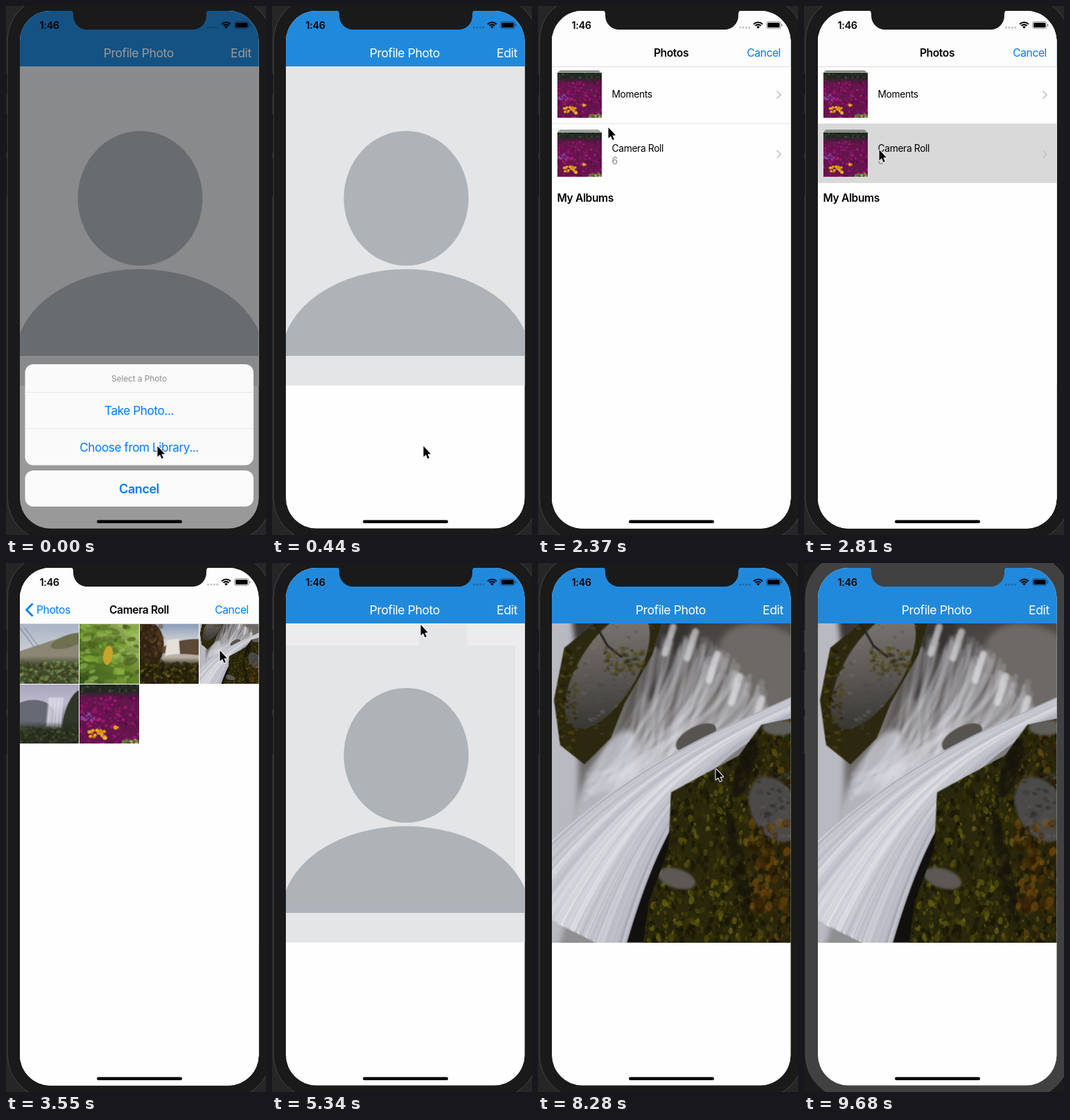
These frames come from a looping animation (375 px wide and 762 px high, 9.78 s). An HTML page with a canvas:

```html
<!DOCTYPE html>
<html lang="en">
<head>
<meta charset="utf-8">
<title>Profile photo picker</title>
<style>
html, body { margin: 0; width: 100%; height: 100%; overflow: hidden; background: #1b1b1b; }
canvas { display: block; width: 375px; height: 762px; }
</style>
</head>
<body>
<canvas id="stage"></canvas>
<script>
const W = 375, H = 762, LOOP = 9780, BEAT = 145;
const LEFT = 20, TOP = 7, WIDTH = 345, BAR = 87, MID = 192;
const BLUE = '#007aff', PAPER = '#fefefe';
const dpr = Math.max(1, window.devicePixelRatio || 1);
const canvas = document.getElementById('stage');
canvas.width = W * dpr;
canvas.height = H * dpr;
const ctx = canvas.getContext('2d');

const runs = [[0, 1], [150, 3], [730, 3], [1630, 8], [2810, 6], [4450, 2],
  [4900, 8], [6220, 3], [6810, 8], [7990, 8], [9680, 1]];

// Pointer moves: start, end, target x, target y.
const moves = [[585, 730, 263, 584], [730, 1020, 199, 421], [1630, 2355, 101, 175],
  [2355, 2645, 108, 207], [3100, 3535, 308, 126], [4755, 5335, 214, 89],
  [5335, 5915, 203, 74], [6075, 6510, 193, 75], [7845, 9005, 392, 775]];

const clamp = v => Math.max(0, Math.min(1, v));
const lerp = (a, b, p) => a + (b - a) * p;
const easeOut = p => 1 - Math.pow(1 - clamp(p), 3);
const easeInOut = p => { p = clamp(p); return p * p * (3 - 2 * p); };

function snap(t) {
  const [start, beats] = runs.filter(r => r[0] <= t).pop();
  return start + BEAT * Math.min(beats - 1, Math.floor((t - start) / BEAT));
}

function seeded(seed) {
  return () => (seed = (seed * 16807) % 2147483647) / 2147483647;
}

function rect(g, color, x, y, w, h) {
  g.fillStyle = color;
  g.fillRect(x, y, w, h);
}

function round(g, color, x, y, w, h, r) {
  g.fillStyle = color;
  g.beginPath();
  g.roundRect(x, y, w, h, r);
  g.fill();
}

function ellipse(g, color, x, y, rx, ry, tilt = 0, from = 0, to = Math.PI * 2) {
  g.fillStyle = color;
  g.beginPath();
  g.ellipse(x, y, rx, ry, tilt, from, to);
  g.fill();
}

function trace(g, pts) {
  g.beginPath();
  for (let i = 0; i < pts.length; i += 2) g.lineTo(pts[i], pts[i + 1]);
}

function poly(g, color, ...pts) {
  trace(g, pts);
  g.fillStyle = color;
  g.fill();
}

function stroke(g, color, width, ...pts) {
  trace(g, pts);
  g.strokeStyle = color;
  g.lineWidth = width;
  g.stroke();
}

function shade(g, x0, y0, x1, y1, ...colors) {
  const s = g.createLinearGradient(x0, y0, x1, y1);
  colors.forEach((c, i) => s.addColorStop(i / (colors.length - 1), c));
  return s;
}

function text(str, x, y, size, color, { weight = 400, align = 'left', track = -0.025 } = {}) {
  ctx.font = `${weight} ${size}px Inter, Roboto, sans-serif`;
  ctx.letterSpacing = `${track * size}px`;
  ctx.textAlign = align;
  ctx.fillStyle = color;
  ctx.fillText(str, x, y);
}

function picture(w, h, seed, paint) {
  const c = document.createElement('canvas');
  c.width = w * 2;
  c.height = h * 2;
  const g = c.getContext('2d');
  g.scale(2, 2);
  g.lineCap = 'round';
  paint(g, seeded(seed));
  return c;
}

// Random dabs inside a box; color(x, r) gets a place across and a random value.
function dabs(g, rnd, n, x, y, w, h, size, stretch, color) {
  for (let i = 0; i < n; i++) {
    const u = rnd(), r = size * (0.4 + rnd());
    ellipse(g, color(u, rnd()), x + u * w, y + rnd() * h, r, r * stretch, rnd() - 0.5);
  }
}

function inside(g, pts, draw) {
  g.save();
  trace(g, pts);
  g.clip();
  draw();
  g.restore();
}

const rapids = picture(345, 459, 77, (g, rnd) => {
  rect(g, shade(g, 120, 0, 200, 260, '#3b3835', '#63605d', '#8f8e91'), 0, 0, 345, 459);
  g.filter = 'blur(8px)';
  ellipse(g, '#6d6a66', 310, 60, 75, 55, 0.5);
  ellipse(g, '#35322f', 165, 45, 22, 70, 0.4);
  ellipse(g, '#b9b9c2', 8, 210, 30, 260, 0.02);
  ellipse(g, '#b4b4bb', 75, 235, 28, 90, 0.45);

  // Cascades falling towards the main stream
  g.filter = 'blur(3px)';
  for (let i = 0; i < 110; i++) {
    const x = 135 + rnd() * 175, y = 10 + rnd() * 40 + Math.max(0, x - 210) * 0.8;
    g.strokeStyle = `rgba(222,222,230,${0.05 + rnd() * 0.2})`;
    g.lineWidth = 2 + rnd() * 8;
    g.beginPath();
    g.moveTo(x, y);
    g.quadraticCurveTo(x - 12, y + 70, lerp(45, 175, rnd()), 215 + rnd() * 40);
    g.stroke();
  }
  for (let x = 175; x < 310; x += 32) {
    const y = 5 + Math.max(0, x - 200);
    stroke(g, 'rgba(240,240,245,.6)', 10, x, y, x - 12, y + 38);
  }
  g.filter = 'blur(1.5px)';
  ellipse(g, '#57534f', 208, 164, 32, 15, -0.5);

  // Boulder
  const boulder = [18, 35, 62, 0, 158, 0, 145, 45, 105, 115, 85, 165, 47, 203, 12, 175, 3, 110];
  poly(g, '#2b280f', ...boulder);
  inside(g, boulder, () => {
    ellipse(g, shade(g, 60, 0, 70, 160, '#77746f', '#595652', '#33312d'), 80, 68, 42, 95, 0.55);
    stroke(g, '#24221f', 3, 62, 0, 80, 32, 100, 48);
    dabs(g, rnd, 130, 5, 40, 30, 150, 3, 0.7, (u, r) => `hsla(52,65%,${6 + r * 18}%,.6)`);
    dabs(g, rnd, 90, 75, 35, 60, 40, 3, 0.7, (u, r) => `hsla(54,65%,${7 + r * 16}%,.5)`);
    dabs(g, rnd, 130, 20, 0, 130, 160, 3, 0.6, (u, r) => `hsla(35,4%,${15 + r * 40}%,.25)`);
  });

  // Main stream
  poly(g, '#11100e', 180, 235, 140, 300, 100, 459, 150, 459, 190, 330);
  for (let i = 0; i < 300; i++) {
    const u = i < 60 ? i / 60 : rnd();
    const tone = 90 - 24 * Math.abs(u - 0.45) + (rnd() - 0.6) * 24;
    g.strokeStyle = `hsla(235,9%,${tone}%,${i < 60 ? 1 : 0.35})`;
    g.lineWidth = i < 60 ? 7 : 1 + rnd() * 4;
    g.beginPath();
    g.moveTo(350, 108 + u * 22);
    g.bezierCurveTo(230, 162 + u * 26, lerp(80, 165, u), lerp(218, 250, u), lerp(-70, 103, u), lerp(390, 475, u));
    g.stroke();
  }

  // Mossy bank
  const bank = [350, 136, 302, 146, 270, 190, 172, 243, 168, 325, 140, 400, 131, 465, 350, 465];
  poly(g, '#29270c', ...bank);
  inside(g, bank, () => {
    g.filter = 'blur(.6px)';
    dabs(g, rnd, 1500, 130, 140, 220, 320, 3, 1.5, (u, r) =>
      `hsla(${56 - Math.max(0, u - 0.6) * 45},75%,${4 + r * r * 25}%,.55)`);
    g.filter = 'blur(3px)';
    ellipse(g, '#4c4a48', 322, 268, 34, 50, -0.5);
    ellipse(g, '#605e5a', 328, 150, 24, 11);
    ellipse(g, '#5c5954', 180, 367, 28, 14, 0.3);
    ellipse(g, 'rgba(20,19,12,.75)', 278, 208, 12, 45, 0.3);
    ellipse(g, 'rgba(20,19,12,.6)', 270, 350, 9, 85, -0.2);
    g.filter = 'blur(1px)';
    dabs(g, rnd, 90, 285, 285, 60, 130, 4, 1.4, (u, r) => `hsla(36,80%,${8 + r * 21}%,.6)`);
    dabs(g, rnd, 70, 298, 215, 50, 95, 4, 0.6, (u, r) => `hsla(35,4%,${10 + r * 32}%,.4)`);
  });
});

// Small pictures share a sky, a ground and a scatter of dabs.
function scene(seed, sky, ground, horizon, color, details) {
  return picture(86, 86, seed, (g, rnd) => {
    rect(g, shade(g, 0, 0, 0, 55, ...sky), 0, 0, 86, 86);
    g.filter = 'blur(1px)';
    details(g, rnd);
    rect(g, shade(g, 0, horizon - 8, 0, horizon + 5, `${ground}00`, ground), 0, horizon - 8, 86, 94);
    dabs(g, rnd, 230, 0, horizon, 86, 86 - horizon, 2.2, 0.8, color);
  });
}

const dunes = scene(12, ['#a9b5c6', '#d5d8da'], '#3f4a2b', 54,
  (u, r) => `hsla(${r < 0.2 ? 12 : 80},32%,${15 + r * 38}%,.55)`,
  g => {
    poly(g, '#8c8775', -3, 40, 45, 24, 90, 12, 90, 70, -3, 70);
    ellipse(g, '#6e704f', 72, 24, 28, 9, -0.3);
    for (const x of [0, 7]) stroke(g, '#707479', 0.8, x, 5, x + 22, 35);
  });

const leaves = picture(86, 86, 31, (g, rnd) => {
  rect(g, shade(g, 0, 86, 86, 0, '#36551b', '#628329', '#a7bd6c'), 0, 0, 86, 86);
  g.filter = 'blur(1px)';
  dabs(g, rnd, 110, 0, 0, 86, 86, 8, 0.5, (u, r) => `hsla(82,48%,${18 + r * 45}%,.5)`);
  ellipse(g, '#c5a52b', 41, 45, 7, 14, 0.15);
});

const gorge = scene(53, ['#8c9eb9', '#d8d8d9', '#91877c'], '#29250d', 56,
  (u, r) => `hsla(48,58%,${5 + r * r * 32}%,.6)`,
  (g, rnd) => {
    ellipse(g, '#5c4936', 72, 34, 40, 12, -0.1);
    poly(g, '#e6e0da', 40, 23, 57, 21, 59, 48, 36, 48);
    ellipse(g, '#b9b0a7', 62, 50, 30, 7);
    ellipse(g, '#342415', 8, 30, 27, 36);
    dabs(g, rnd, 70, 0, 0, 33, 60, 3, 1, (u, r) => `hsla(31,43%,${8 + r * 28}%,.5)`);
  });

const falls = scene(91, ['#aaa6bf', '#bdb9cc', '#777989'], '#272e1f', 62,
  (u, r) => `hsla(80,25%,${9 + r * 22}%,.5)`,
  (g, rnd) => {
    ellipse(g, '#666873', 15, 48, 36, 25, -0.2);
    ellipse(g, '#30362a', 82, 48, 18, 42, 0.25);
    for (let x = 42; x < 64; x += 2) {
      stroke(g, `rgba(222,220,234,${0.4 + rnd() * 0.5})`, 2.5, x, 20, x - 4, 64);
    }
  });

const flowers = scene(8, ['#202a1f', '#3b243a'], '#64164c', 17,
  (u, r) => `hsla(${310 + r * 14},78%,${16 + r * 32}%,.65)`,
  (g, rnd) => dabs(g, rnd, 70, 0, 0, 86, 16, 2, 0.7, (u, r) => `hsla(105,18%,${8 + r * 33}%,.6)`));
(() => {
  const g = flowers.getContext('2d'), rnd = seeded(21);
  dabs(g, rnd, 18, 3, 40, 18, 12, 1.7, 1, () => 'hsl(282,42%,46%)');
  dabs(g, rnd, 24, 14, 66, 24, 13, 2.5, 0.8, (u, r) => `hsl(${35 + r * 8},88%,${40 + r * 18}%)`);
  dabs(g, rnd, 6, 51, 60, 5, 4, 2, 1, () => '#eba31c');
  dabs(g, rnd, 50, 62, 80, 24, 6, 2, 0.7, (u, r) => `hsl(75,32%,${20 + r * 45}%)`);
})();

function photo(img, x, y, w, h) {
  const ih = Math.min(img.height, img.width * h / w);
  ctx.drawImage(img, 0, (img.height - ih) / 2, img.width, ih, x, y, w, h);
}

function chevron(x, y, w, h, color, width) {
  ctx.lineCap = 'butt';
  stroke(ctx, color, width, x, y - h / 2, x + w, y, x, y + h / 2);
}

function statusBar() {
  text('1:46', 48.5, 33, 14.5, '#000', { weight: 600 });
  for (let i = 0; i < 4; i++) ellipse(ctx, 'rgba(0,0,0,.24)', 291.5 + i * 4.4, 31, 1.5, 1.5);
  ctx.strokeStyle = '#000';
  for (const [r, width] of [[9, 2.1], [5.6, 2.1], [1.6, 3.2]]) {
    ctx.lineWidth = width;
    ctx.beginPath();
    ctx.arc(317.5, 32.5, r, -Math.PI * 0.75, -Math.PI * 0.25);
    ctx.stroke();
  }
  ctx.strokeStyle = 'rgba(0,0,0,.45)';
  ctx.lineWidth = 0.9;
  ctx.beginPath();
  ctx.roundRect(329.5, 22.5, 20.5, 10, 2.8);
  ctx.stroke();
  round(ctx, '#000', 331, 24, 17.5, 7, 1.5);
  round(ctx, 'rgba(0,0,0,.45)', 351, 25.8, 1.3, 3.5, 0.6);
}

function profile(t) {
  const done = t >= 6810;
  rect(ctx, PAPER, LEFT, TOP, WIDTH, 746);
  rect(ctx, '#2189dc', LEFT, TOP, WIDTH, BAR - TOP);
  if (done) {
    photo(rapids, LEFT, BAR, WIDTH, 459.5);
  } else {
    rect(ctx, '#e4e5e7', LEFT, BAR, WIDTH, 459.5);
    if (t >= 4590) {
      rect(ctx, '#ececee', LEFT, BAR, WIDTH, 32);
      rect(ctx, '#ececee', 351, 119, 14, 350);
      rect(ctx, '#e4e5e7', 212, 89, 69, 30);
    }
    ellipse(ctx, '#adb3b7', 193.5, 277, 90, 97);
    ellipse(ctx, '#adb3b7', 193, 504, 179, 125, 0, Math.PI);
  }
  const title = done && t < 7540 ? 'Updating...' : 'Profile Photo';
  text(title, 191.3, 73.5, 17.6, '#fff', { align: 'center' });
  text('Edit', 353.7, 73.5, 17.6, '#fff', { align: 'right' });
}

function albumRow(y, name, count, alpha) {
  rect(ctx, '#3c463a', 31, y - 3, 57, 0.8);
  rect(ctx, '#222c20', 29, y - 1.5, 61, 0.8);
  photo(flowers, 27.5, y, 64, 64.5);
  text(name, 106.5, y + (count ? 28 : 35.5), 13.8, '#000');
  if (count) text(count, 106.5, y + 46.5, 13.8, `rgba(135,135,140,${alpha})`);
  chevron(344.5, y + 32, 5.5, 11, '#c2c2c7', 1.7);
}

function albums(t) {
  const settled = easeOut((t - 1500) / 400);
  rect(ctx, PAPER, LEFT, BAR, WIDTH, 670);
  if (t >= 2810) rect(ctx, '#d9d9d9', LEFT, 170, WIDTH, 85);
  rect(ctx, `rgba(222,222,224,${settled})`, LEFT, 169, WIDTH, 0.8);
  albumRow(96, 'Moments');
  albumRow(181.5, 'Camera Roll', '6', settled);
  text('My Albums', 27.5, 282, 15.6, '#000', { weight: 600 });
}

function roll() {
  rect(ctx, PAPER, LEFT, BAR, WIDTH, 670);
  [dunes, leaves, gorge, rapids, falls, flowers].forEach((img, i) =>
    photo(img, LEFT + (i % 4) * 86.4, 88.3 + Math.floor(i / 4) * 86.6, 85.4, 85.4));
}

function shifted(dx, alpha, draw) {
  ctx.save();
  ctx.translate(dx, 0);
  ctx.globalAlpha = alpha;
  draw();
  ctx.restore();
}

function picker(t, offset) {
  const push = easeInOut((t - 2810) / 560), rest = 1 - push;
  const heading = { weight: 600, align: 'center' };
  ctx.save();
  ctx.translate(0, offset);
  rect(ctx, PAPER, LEFT, 6, WIDTH, 760);
  if (push < 1) shifted(-104 * push, 1, () => albums(t));
  if (push > 0) shifted(WIDTH * rest, 1, roll);
  rect(ctx, '#fdfdfd', LEFT, 6, WIDTH, 81);
  rect(ctx, '#d5d5d7', LEFT, BAR, WIDTH, 0.8);
  shifted(-130 * push, rest, () => text('Photos', MID, 73, 15.6, '#000', heading));
  shifted(150 * rest, push, () => text('Camera Roll', MID, 73, 15.6, '#000', heading));
  shifted(110 * rest, push, () => text('Photos', 44, 73, 15.6, BLUE));
  shifted(0, push, () => chevron(38.5, 67.5, -9, 18, BLUE, 2.7));
  text('Cancel', 350, 73, 15.6, BLUE, { align: 'right' });
  ctx.restore();
}

function sheet(p) {
  const center = { align: 'center' };
  rect(ctx, `rgba(0,0,0,${0.4 * (1 - p)})`, LEFT, TOP, WIDTH, 746);
  ctx.save();
  ctx.translate(0, 245 * p);
  round(ctx, '#fafafa', 27.5, 516, 329.5, 145.5, 12);
  for (const y of [556, 608.5]) rect(ctx, '#e4e4e4', 27.5, y, 329.5, 0.8);
  round(ctx, '#fbfbfb', 27.5, 669, 329.5, 52, 12);
  text('Select a Photo', MID, 541, 12, '#8f8f8f', { align: 'center', track: -0.01 });
  text('Take Photo...', MID, 589, 17.2, BLUE, center);
  text('Choose from Library...', MID, 642, 17.2, BLUE, center);
  text('Cancel', MID, 701.5, 18, BLUE, { align: 'center', weight: 600 });
  ctx.restore();
}

function phone(body, lit) {
  rect(ctx, lit ? '#1b1b1b' : '#262626', 0, 0, W, H);
  for (const [y, h] of [[97, 31], [155, 56], [220, 54]]) {
    rect(ctx, lit ? '#353535' : '#121212', 0, y, 3, h);
  }
  round(ctx, body, 2, -13, 381, 784, 63);
  ctx.strokeStyle = lit ? '#4a4a4a' : '#444';
  ctx.lineWidth = 1;
  ctx.stroke();
}

function notch(body) {
  ctx.fillStyle = body;
  ctx.beginPath();
  ctx.moveTo(90, 5);
  ctx.arcTo(97, 7, 97, 14, 6);
  ctx.arcTo(97, 34, 118, 34, 20);
  ctx.arcTo(289, 34, 289, 14, 20);
  ctx.arcTo(289, 7, 296, 5, 6);
  ctx.lineTo(296, 5);
  ctx.fill();
}

function pointer(t) {
  const [x, y] = moves.reduce(([px, py], [from, to, nx, ny]) => {
    const p = easeInOut((t - from) / (to - from));
    return [lerp(px, nx, p), lerp(py, ny, p)];
  }, [218, 634]);
  const arrow = [0.5, 0, 0.5, 15.5, 4, 12.2, 6.5, 18, 8.9, 17, 6.4, 11.4, 11, 11.2, 0.5, 0];
  ctx.save();
  ctx.translate(x, y);
  ctx.lineJoin = 'round';
  stroke(ctx, '#fff', 2, ...arrow);
  poly(ctx, '#000', ...arrow);
  ctx.restore();
}

function pickerOffset(t) {
  if (t < 1630 || t >= 4590) return H;
  return t >= 4450 ? 480 : 296 * (1 - easeOut((t - 1630) / 435));
}

function render(t) {
  const lit = t >= 9680, body = lit ? '#414141' : '#1a1a1a', offset = pickerOffset(t);
  ctx.setTransform(dpr, 0, 0, dpr, 0, 0);
  phone(body, lit);
  ctx.save();
  ctx.beginPath();
  ctx.roundRect(LEFT, TOP, WIDTH - 0.5, 745.5, 44);
  ctx.clip();
  profile(t);
  if (offset < H) picker(t, offset);
  statusBar();
  if (t < 440) sheet(t < 150 ? 0 : easeInOut((t - 20) / 400));
  round(ctx, '#000', 131, 740.5, 123, 4.5, 2.2);
  ctx.restore();
  notch(body);
  if (!lit) pointer(t);
}

const start = performance.now();
let shown = -1;
function frame() {
  const t = snap(Math.max(0, performance.now() - start) % LOOP);
  if (t !== shown) render(shown = t);
  requestAnimationFrame(frame);
}
frame();
document.fonts.ready.then(() => { shown = -1; });
</script>
</body>
</html>
```
